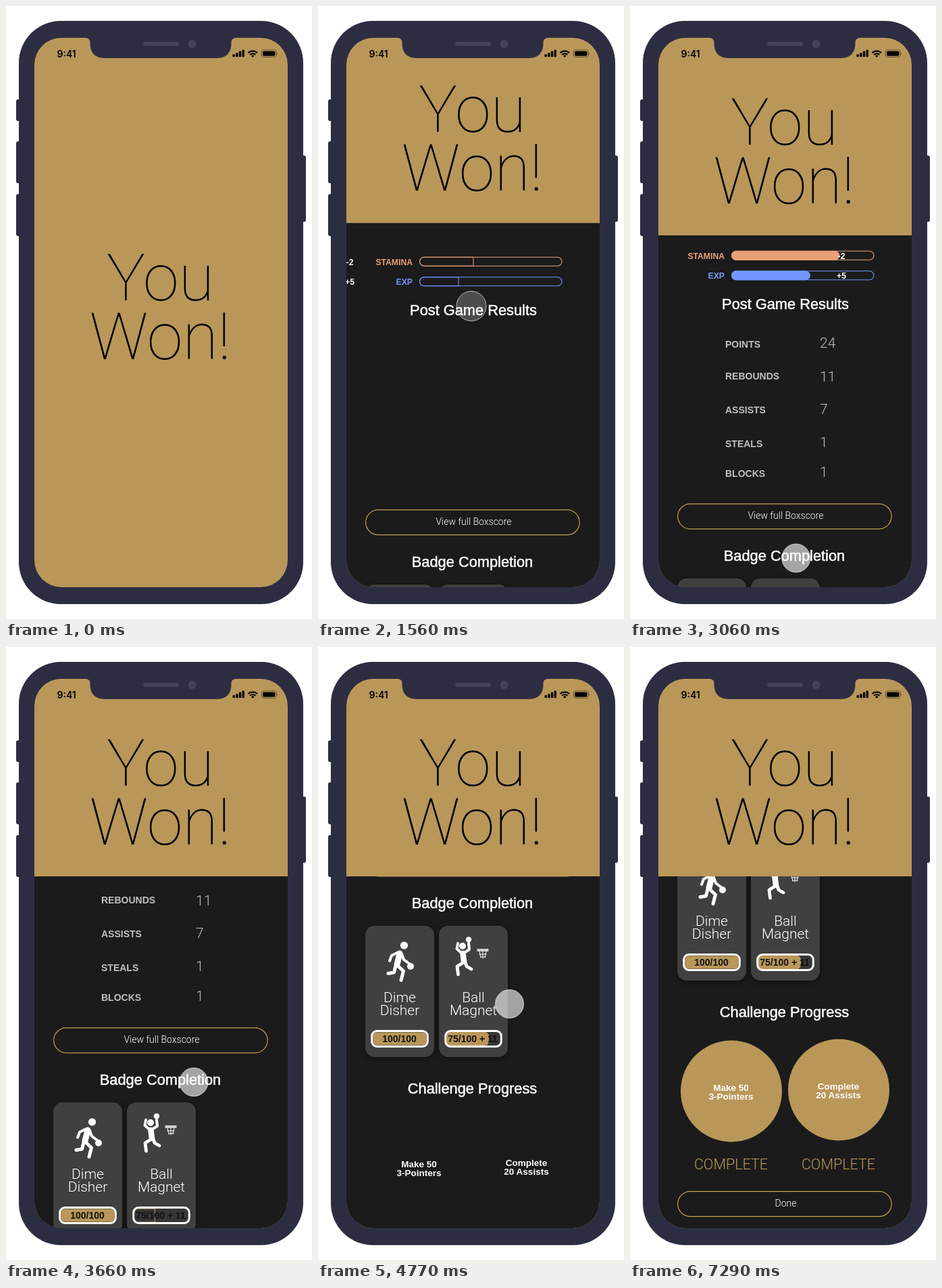
Write an HTML page that moves like this. It is 453 by 906 pixels and loops after 7.32 s.

```html
<!DOCTYPE html>
<html lang="en">
<head>
<meta charset="utf-8">
<title>You Won</title>
<style>
  html, body { margin: 0; width: 100%; height: 100%; overflow: hidden; background: #fff; }
  svg { display: block; width: 100vw; height: 100vh; }
  text { font-family: "Liberation Sans", Arial, sans-serif; fill: #fff; }
  .mid { text-anchor: middle; }
  .end { text-anchor: end; }
  .bold { font-weight: 700; }
  .light { font-family: Roboto, "Liberation Sans", sans-serif; font-weight: 300; }
  .head { font-size: 21.8px; stroke: #fff; stroke-width: .5px; }
  .hero { font-size: 95.6px; font-weight: 200; fill: #000; }
  .clock { font: 600 14px Inter, "Liberation Sans", sans-serif; fill: #000; }
  .s12 { font-size: 12.2px; }
  .s13 { font-size: 13.5px; }
  .s14 { font-size: 14px; }
  .s21 { font-size: 21px; }
  .ink { fill: #111; }
  .gold { fill: #b99759; }
  .row text { fill: #c0c0c0; }
  .pill { fill: none; stroke: #c49d55; stroke-width: 1.2; }
  .card { filter: drop-shadow(0 2px 4px rgba(0, 0, 0, .45)); }
  .man { fill: none; stroke: #fff; stroke-linecap: round; stroke-linejoin: round; }
</style>
</head>
<body>
<svg viewBox="0 0 453 906" id="stage"></svg>
<script>
const LOOP = 7320;
const GOLD = '#b99759', BODY = '#2d2d42', DARK = '#1b1b1b';
const ORANGE = '#e8a077', BLUE = '#7396ff';

// Markup helpers
const text = (x, y, cls, str, extra = '') => `<text x="${x}" y="${y}" class="${cls}" ${extra}>${str}</text>`;
const rect = (x, y, w, h, r, extra = '') =>
  `<rect x="${x}" y="${y}" width="${w}" height="${h}" rx="${r}" ${extra}/>`;
const dot = (x, y, r, extra = '') => `<circle cx="${x}" cy="${y}" r="${r}" ${extra}/>`;
const line = (d, w) => `<path d="${d}" class="man" stroke-width="${w}"/>`;
const fill = c => `fill="${c}"`;
const level = (id, color) => `<path id="${id}" fill="${color}" stroke="${color}"/>`;

const meter = (id, y, label, color, value) =>
  text(140, y + 11.5, 'bold s12 end', label, `style="fill:${color}"`) +
  rect(150.5, y, 210.5, 13, 6.5, `fill="none" stroke="${color}" stroke-width="1.1"`) +
  level(id, color) +
  `<g class="gain">${text(313, y + 11.5, 'bold s12 mid', value)}</g>`;

const rows = [
  ['POINTS', 24, 505, 505], ['REBOUNDS', 11, 552, 555], ['ASSISTS', 7, 602, 603],
  ['STEALS', 1, 652, 652], ['BLOCKS', 1, 696, 696]
].map(([name, n, y, ny]) =>
  `<g class="row">${text(141, y, 'bold s14', name)}${text(281, ny, 'light s21', n)}</g>`).join('');

const pill = (y, label) =>
  rect(70.7, y, 316.5, 37, 18.5, 'class="pill"') + text(230.5, y + 22, 'light s14 mid', label);

// Card art is placed relative to the card's top left corner
const runner = dot(57.5, 29, 5.6, fill('#fff')) + dot(67, 60, 5, fill('#fff')) +
  line('M51 41L47 57', 9) +
  line('M48 39.500L39 44L36 52M54 42L57 50L65 56', 4) +
  line('M49 60L56.500 67L53 80.500M45 59L42.500 69L34 70.500', 5) ;
const catcher = dot(44, 20.5, 4.2, fill('#fff')) + dot(35, 30, 5, fill('#fff')) +
  line('M35.500 41L37 53', 8.5) +
  line('M32 39L26.500 34L28 26M39 39L45 35L44 26', 4) +
  line('M35 55L27 60L28.500 72M39 54L41 60L48 64', 4.8) +
  line('M57 35H73M57 37H73', 1.4) +
  line('M60 38L62 47M65 38V48M70 38L68 47M60 42H70M62 46H69', 1);

const card = (x, art, a, b, bar) =>
  `<g transform="translate(${x} 846)">` +
  rect(0, 0, 102, 194, 14, 'fill="#404040" class="card"') + art +
  text(51, 113, 'light s21 mid', a) + text(51, 132, 'light s21 mid', b) + bar + '</g>';
const frame = rect(9.7, 155.5, 82.6, 23, 7.5, 'fill="none" stroke="#fff" stroke-width="3"');
const fullBar = rect(11.5, 157.5, 79, 19, 5.5, fill(GOLD)) + frame +
  text(50.5, 172, 'bold s14 ink mid', '100/100');
const partBar = rect(9.7, 155.5, 82.6, 23, 7.5, fill('#363636')) + level('magnet', GOLD) +
  frame + text(50, 172, 'bold s14 ink mid', '75/100 + 11');

const goal = (x, y, a, b) =>
  dot(x, y, 75, `class="disc" fill="${GOLD}"`) +
  text(x - .5, y - .5, 'bold s13 mid', a) + text(x - .5, y + 12.5, 'bold s13 mid', b) +
  `<g class="done">${text(x - .5, 1318.5, 'light gold mid', 'COMPLETE', 'font-size="21.5"')}</g>`;

const content =
  meter('stamina', 362.3, 'STAMINA', ORANGE, '-2') +
  meter('exp', 391.8, 'EXP', BLUE, '+5') +
  text(230, 448, 'head mid', 'Post Game Results') + rows +
  pill(735.8, 'View full Boxscore') +
  text(228.5, 820.3, 'head mid', 'Badge Completion') +
  card(70, runner, 'Dime', 'Disher', fullBar) +
  card(179, catcher, 'Ball', 'Magnet', partBar) +
  text(228.5, 1094, 'head mid', 'Challenge Progress') +
  goal(150, 1203.5, 'Make 50', '3-Pointers') +
  goal(309, 1201.5, 'Complete', '20 Assists') +
  pill(1351.7, 'Done');

const signal = [4, 6, 8.5, 10.5].map((h, i) => rect(335.5 + i * 4.7, 75.3 - h, 3.3, h, .8)).join('');
const wifi = `<g fill="none" stroke="#000" stroke-width="2.1">
  <path d="M358.500 69.300a9.600 9.600 0 0 1 13.600 0M361.100 72a5.900 5.900 0 0 1 8.400 0"/></g>
  <path d="M365.300 76l-2.300-2.400a3.300 3.300 0 0 1 4.600 0z"/>`;
const battery = rect(378.3, 65, 21.7, 10.5, 3, 'fill="none" stroke="#000" stroke-opacity=".45"') +
  rect(380, 66.7, 18.3, 7.1, 1.7) + '<path d="M401.200 68.500q2 1.700 0 3.500z" opacity=".5"/>';

const keys = [[15, 138, 32], [15, 200, 62], [15, 278, 62], [434, 221, 98]]
  .map(([x, y, h]) => rect(x, y, 10, h, 3, fill(BODY))).join('');

const stage = document.getElementById('stage');
stage.innerHTML = `
  <defs>
    <clipPath id="screen">${rect(42, 47, 375, 812, 40)}</clipPath>
    <clipPath id="below">${rect(42, 859, 375, 812, 0, 'id="cut"')}</clipPath>
  </defs>
  ${keys}${rect(19, 22, 421, 862, 62, fill(BODY))}
  <g clip-path="url(#screen)">
    ${rect(42, 47, 375, 812, 0, fill(GOLD))}
    <g clip-path="url(#below)">
      ${rect(42, 47, 375, 812, 0, fill(DARK))}
      <g id="content">${content}</g>
    </g>
    <g id="hero">${text(228.5, 435, 'light hero mid', 'You')}${text(228, 521.5, 'light hero mid', 'Won!')}</g>
    <circle id="touch" fill="#fff" stroke="#fff" stroke-width="1"/>
  </g>
  <path fill="${BODY}" d="M117 46V47Q124.500 47 124.500 54V55Q124.500 77 147 77H311Q333.500 77 333.500 55V54Q333.500 47 341 47V46Z"/>
  ${rect(203, 53, 53, 6, 3, fill('#42425a'))}${dot(275.7, 56, 6, fill('#42425a'))}
  ${text(75.5, 75.5, 'clock', '9:41')}${signal}${wifi}${battery}`;

// Timing
const ease = {
  lin: u => u,
  io: u => u * u * (3 - 2 * u),
  in: u => u * u,
  quad: u => 1 - (1 - u) ** 2,
  out: u => 1 - (1 - u) ** 3,
  back: u => 1 + 2.2 * (u - 1) ** 3 + 1.2 * (u - 1) ** 2
};

// Each step is [time, value, easing used to arrive there]
function at(steps, t) {
  if (t <= steps[0][0]) return steps[0][1];
  for (let i = 1; i < steps.length; i++) {
    const [t1, v1, e = 'lin'] = steps[i];
    if (t < t1) {
      const [t0, v0] = steps[i - 1];
      return v0 + (v1 - v0) * ease[e]((t - t0) / (t1 - t0));
    }
  }
  return steps[steps.length - 1][1];
}
const part = (t, from, to, e = 'lin') => at([[from, 0], [to, 1, e]], t);

const HOVER = .22, PRESS = .6;
const track = {
  hero: [[950, 0], [1530, -249, 'io'], [1560, -249], [1860, -230, 'out']],
  panel: [[950, 859], [1530, 320.5, 'io'], [1560, 320.5], [1860, 339, 'out']],
  scroll: [[950, 520], [1530, 9, 'io'], [1560, 9], [1860, 0, 'out'], [3060, 0],
    [3840, -291.4, 'in'], [4406, -434, 'out'], [4780, -434], [5330, -546.5, 'io'], [5480, -547]],
  touchX: [[950, 232], [1530, 227, 'io'], [1560, 227], [3000, 245, 'quad'],
    [3660, 278, 'io'], [4770, 283.5, 'io'], [5340, 279, 'io']],
  touchY: [[950, 692], [1530, 443, 'io'], [1560, 443], [3000, 809, 'quad'],
    [3060, 816], [3840, 524.6, 'in'], [4600, 527.5, 'io'], [4780, 527.5], [5330, 415, 'io']],
  touchA: [[780, 0], [850, HOVER], [930, HOVER], [950, PRESS], [1530, PRESS], [1550, HOVER],
    [3030, HOVER], [3060, PRESS], [3840, PRESS], [3870, HOVER], [4690, HOVER], [4720, PRESS],
    [5360, PRESS], [5390, HOVER], [5550, HOVER], [5700, 0]]
};

const $ = id => document.getElementById(id);
const all = sel => [...stage.querySelectorAll(sel)];
const set = (el, attrs) => { for (const k in attrs) el.setAttribute(k, attrs[k]); };
const move = (el, x, y) => el.setAttribute('transform', `translate(${x} ${y})`);

const el = Object.fromEntries(
  ['cut', 'content', 'hero', 'touch', 'stamina', 'exp', 'magnet'].map(id => [id, $(id)]));
const gains = all('.gain'), rowEls = all('.row'), discs = all('.disc'), dones = all('.done');

// A level starts as an outline with a straight end, then fills and rounds off
function grow(bar, x, y, h, r, from, to, u) {
  const q = r * u, right = x + from + (to - from) * u;
  set(bar, {
    d: `M${x + r} ${y}H${right - q}a${q} ${q} 0 0 1 ${q} ${q}v${h - 2 * q}` +
      `a${q} ${q} 0 0 1 ${-q} ${q}H${x + r}a${r} ${r} 0 0 1 ${-r} ${-r}v${2 * r - h}a${r} ${r} 0 0 1 ${r} ${-r}z`,
    'fill-opacity': Math.min(1, u * 2)
  });
}

function draw(t) {
  move(el.hero, 0, at(track.hero, t));
  move(el.content, 0, at(track.scroll, t));
  set(el.cut, { y: at(track.panel, t) });

  const alpha = at(track.touchA, t);
  set(el.touch, {
    cx: at(track.touchX, t), cy: at(track.touchY, t), r: alpha > HOVER ? 21 : 22,
    'fill-opacity': alpha, 'stroke-opacity': Math.min(.65, alpha * 3)
  });

  const gain = part(t, 1590, 2080, 'out');
  grow(el.stamina, 150.5, 362.3, 13, 6.5, 79.5, 159.5, gain);
  grow(el.exp, 150.5, 391.8, 13, 6.5, 57.5, 116, gain);
  grow(el.magnet, 10.5, 157, 20, 6, 31, 63, part(t, 3900, 4400, 'out'));
  gains.forEach(g => move(g, -266 * (1 - gain), 0));
  rowEls.forEach((r, i) => set(r, { opacity: part(t, 1760 + 170 * i, 2100 + 170 * i) }));

  const size = Math.max(0, part(t, 4850, 5230, 'back'));
  discs.forEach(d => set(d, { r: 75 * size }));
  dones.forEach(d => set(d, { opacity: part(t, 5030, 5280) }));
}

const start = performance.now();
function tick() {
  draw((performance.now() - start) % LOOP);
  requestAnimationFrame(tick);
}
tick();
</script>
</body>
</html>
```
